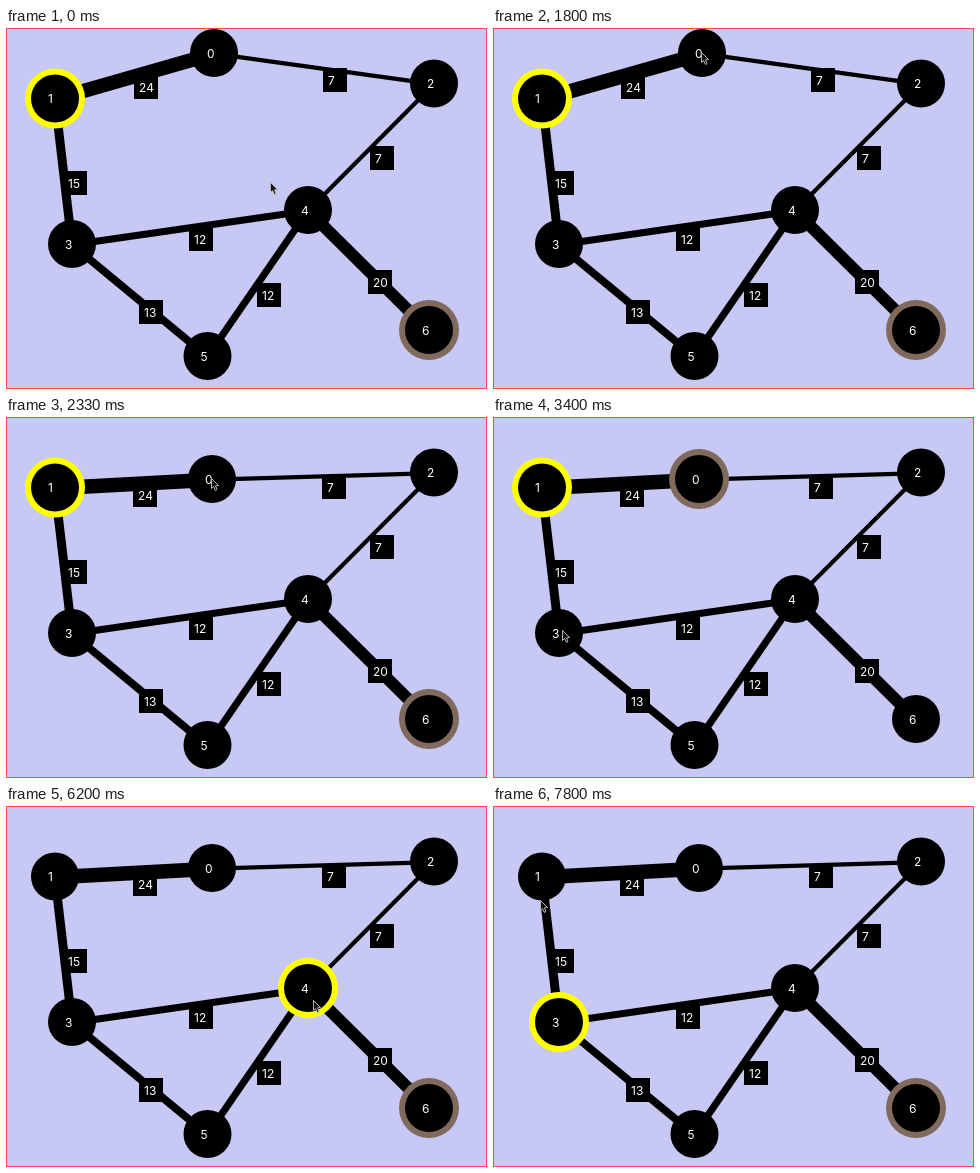
An HTML page with a canvas that plays this animation: 481x361 px, repeating every 8 s.

```html
<!DOCTYPE html>
<html lang="en">
<head>
<meta charset="utf-8">
<title>Weighted graph</title>
<style>
html, body { margin: 0; width: 100%; height: 100%; overflow: hidden; background: #c8c8f5; }
canvas { display: block; }
</style>
</head>
<body>
<canvas id="stage" width="481" height="361"></canvas>
<script>
const ctx = document.getElementById('stage').getContext('2d');
const LOOP = 8000, STEP = 1000 / 15;
const DRAG_START = 1470, DRAG_END = 2400;

const nodes = [[208, 25], [49, 70.5], [428, 55.5], [66, 216], [302, 182], [201.5, 328], [423, 302]];
const home = nodes[0];
// from, to, weight
const edges = [[0, 1, 24], [0, 2, 7], [1, 3, 15], [2, 4, 7], [3, 4, 12], [3, 5, 13], [4, 5, 12], [4, 6, 20]];

// Selected node from a given time on
const startNode = [[0, 1], [6200, 4], [7200, 3]];
const endNode = [[0, 6], [2460, 0], [3530, 3], [4330, 6]];

// Pointer glides: start, end, target x, target y; it leaves the stage once
const glides = [
  [0, 0, 265, 155], [200, 330, 244, 141], [400, 400, -50, -50], [600, 600, 186, 2],
  [600, 1000, 206, 18], [1270, 1470, 209, 25], [1800, 1930, 206, 62], [2800, 3200, 70, 214],
  [3600, 3930, 392, 311], [4200, 4200, 416, 307], [4730, 5000, 317, 218], [5130, 5400, 308, 195],
  [6670, 6800, 57, 219], [7470, 7800, 48, 95]
];

const selected = (track, t) => nodes[track.findLast(([start]) => start <= t)[1]];
const ease = p => p * p * (3 - 2 * p);

function pointerAt(t) {
  let x = 0, y = 0;
  for (const [start, end, toX, toY] of glides) {
    if (t < start) break;
    const p = t >= end ? 1 : ease((t - start) / (end - start));
    x += (toX - x) * p;
    y += (toY - y) * p;
  }
  return [x, y];
}

function disc([x, y], r, color) {
  ctx.fillStyle = color;
  ctx.beginPath();
  ctx.arc(x, y, r, 0, Math.PI * 2);
  ctx.fill();
}

function label(text, x, y) {
  ctx.fillStyle = '#fff';
  ctx.fillText(text, x, y + 4.5);
}

function drawEdge(a, b, weight) {
  ctx.strokeStyle = '#000';
  ctx.lineWidth = weight * 0.6;
  ctx.beginPath();
  ctx.moveTo(a[0], a[1] + 0.7);
  ctx.lineTo(b[0], b[1] + 0.7);
  ctx.stroke();
}

function drawWeight(a, b, weight) {
  const x = Math.floor((a[0] + b[0] - 1) / 2), y = Math.floor((a[1] + b[1]) / 2);
  ctx.fillStyle = '#000';
  ctx.fillRect(x, y, 24, 24);
  label(weight, x + 5, y + 12);
}

function drawPointer([x, y]) {
  ctx.save();
  ctx.translate(x - 0.5, y - 0.5);
  ctx.beginPath();
  for (const p of [[0, 0], [0, 10], [2, 8], [4, 12], [5.5, 11], [4, 7.3], [7, 7]]) ctx.lineTo(...p);
  ctx.closePath();
  ctx.fillStyle = '#111';
  ctx.fill();
  ctx.strokeStyle = '#b4b4b4';
  ctx.lineWidth = 1;
  ctx.stroke();
  ctx.restore();
}

function draw(t) {
  nodes[0] = t < DRAG_START ? home : pointerAt(Math.min(t, DRAG_END));
  ctx.fillStyle = '#c8c8f5';
  ctx.fillRect(0, 0, 481, 361);
  ctx.strokeStyle = '#ff4545';
  ctx.lineWidth = 1;
  ctx.strokeRect(0.5, 0.5, 480, 360);

  ctx.font = '12px Inter, sans-serif';
  for (const [a, b, w] of edges) drawEdge(nodes[a], nodes[b], w);
  for (const [a, b, w] of edges) drawWeight(nodes[a], nodes[b], w);
  disc(selected(endNode, t), 30, '#806a5e');
  disc(selected(startNode, t), 30, '#ff0');
  nodes.forEach((p, i) => {
    disc(p, 24, '#000');
    label(i, p[0] - 7, p[1]);
  });
  drawPointer(pointerAt(t));
}

function tick() {
  const t = performance.now() % LOOP;
  // Advance at 15 pictures a second
  draw(Math.floor((t + 5) / STEP) * STEP);
  requestAnimationFrame(tick);
}
tick();
</script>
</body>
</html>
```
